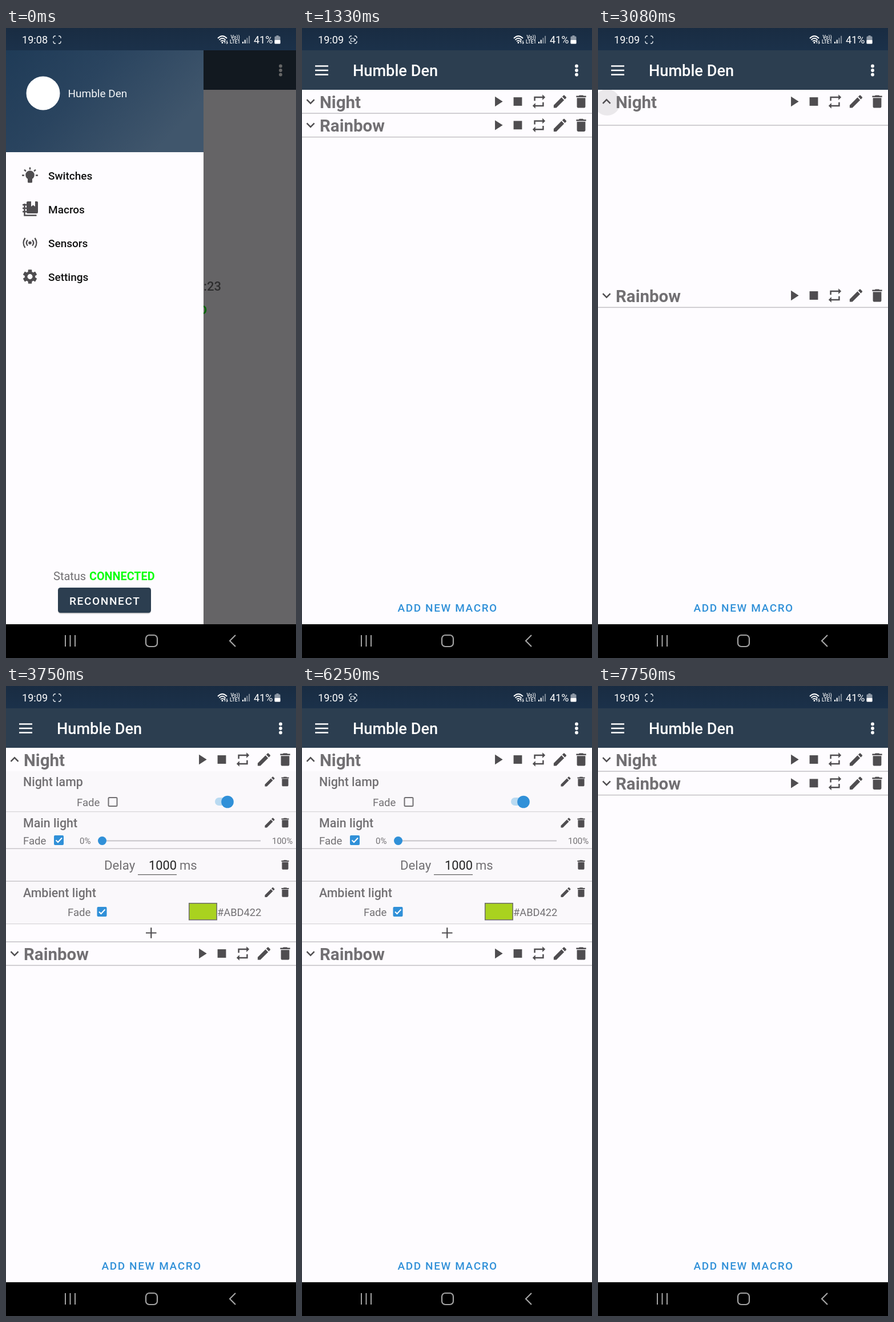
Write an HTML page that moves like this. It is 508 px wide and 1101 px high and loops after 8 s.

```html
<!DOCTYPE html>
<html lang="en">
<head>
<meta charset="utf-8">
<title>Room control</title>
<style>
  html, body { margin: 0; width: 100%; height: 100%; overflow: hidden; background: #000; }
  svg { display: block; width: 100%; height: 100%; font-family: Roboto, "Noto Sans", sans-serif; }
  text { white-space: pre; }
</style>
</head>
<body>
<svg id="stage" viewBox="0 0 508 1101"></svg>
<script>
const LOOP = 8000, APP = "Humble Den";
const PAGE = "#fefcff", BAR = "#2c3e50", GREY = "#727073", DARK = "#4f4d50", BLUE = "#3090d8";

const ICONS = {
  more: "M16.59 8.59 12 13.17 7.41 8.59 6 10l6 6 6-6z",
  less: "M12 8l-6 6 1.41 1.41L12 10.83l4.59 4.58L18 14z",
  play: "M8 5v14l11-7z",
  stop: "M6 6h12v12H6z",
  pause: "M6 19h4V5H6zM14 5v14h4V5z",
  repeat: "M7 7h10v3l4-4-4-4v3H5v6h2zM17 17H7v-3l-4 4 4 4v-3h12v-6h-2z",
  edit: "M3 17.25V21h3.75L17.81 9.94l-3.75-3.75zM20.71 7.04c.39-.39.39-1.02 0-1.41l-2.34-2.34c-.39-.39-1.02-.39-1.41 0l-1.83 1.83 3.75 3.75z",
  trash: "M6 19c0 1.1.9 2 2 2h8c1.1 0 2-.9 2-2V7H6zM19 4h-3.5l-1-1h-5l-1 1H5v2h14z"
};

const text = (x, y, size, str, fill = GREY, more = "") =>
  `<text x="${x}" y="${y}" font-size="${size}" fill="${fill}" ${more}>${str}</text>`;
const rect = (x, y, w, h, fill, more = "") =>
  `<rect x="${x}" y="${y}" width="${w}" height="${h}" fill="${fill}" ${more}/>`;
const disc = (x, y, r, fill, more = "") =>
  `<circle cx="${x}" cy="${y}" r="${r}" fill="${fill}" ${more}/>`;
const line = (d, color, width, more = "") =>
  `<path d="${d}" fill="none" stroke="${color}" stroke-width="${width}" ${more}/>`;
const icon = (name, x, y, scale = 1.235, fill = DARK, more = "") =>
  `<path d="${ICONS[name]}" fill="${fill}" transform="translate(${x} ${y}) scale(${scale}) translate(-12 -12)" ${more}/>`;
const group = (id, body, more = "") => `<g id="${id}" ${more}>${body}</g>`;
const MEDIUM = 'font-weight="500"', BOLD = 'font-weight="700"';

function statusBar() {
  const corners = "M83 18v-1q0-3 3-3h1M92 14h1q3 0 3 3v1M96 23v1q0 3-3 3h-1M87 27h-1q-3 0-3-3v-1";
  const bars = [0, 1, 2, 3].map(i =>
    rect(414 + i * 3.7, 24 - i * 3.4, 2, 3 + i * 3.4, "#fff", i > 1 ? 'opacity=".45"' : "")).join("");
  return rect(0, 0, 508, 39, "url(#sky)") +
    text(28, 27, 18.1, "", "#fff", 'id="clock"') +
    line(corners, "#e8edf2", 1.3) +
    group("camera", rect(85.5, 18, 6, 5.5, "none", 'rx="1" stroke="#e8edf2" stroke-width="1.2"') +
      `<path d="M91.5 20.5l2.5-2v4.5z" fill="#e8edf2"/>`) +
    line("M371 18q8-8 16 0M373.5 20.8q5.500-5.500 11 0M376 23.400q3-3 6 0", "#fff", 1.8) +
    disc(379, 25.5, 1.5, "#fff") +
    line("M383.5 27v-5l-1.500 1.500M387 22v5l1.500-1.500", "#fff", 1.2) +
    text(393.5, 19, 8.5, "Vo))", "#fff", MEDIUM) + text(392, 27, 8.3, "LTE1", "#fff", MEDIUM) +
    bars + text(434, 27, 18, "41%", "#fff") +
    rect(473.500, 13, 4, 2, "#8d98a5") + rect(470.5, 14.500, 10, 13, "#8d98a5", 'rx="1.5"') +
    rect(470.5, 21, 10, 6.500, "#fff", 'rx="1"');
}

const toolbar = () => rect(0, 39, 508, 69, BAR) +
  line("M23 66.5h23M23 74h23M23 81.500h23", "#fff", 2.6) +
  text(89, 84, 27.2, APP, "#fff", MEDIUM) +
  [66.500, 74, 81.500].map(y => disc(481, y, 2.9, "#fff")).join("");

const navBar = () => rect(0, 1042, 508, 59, "#000") +
  line("M104 1061v20M112.500 1061v20M121 1061v20", "#a3a3a3", 2) +
  rect(245, 1061, 20, 20, "none", 'rx="6" stroke="#a3a3a3" stroke-width="2.2"') +
  line("M402 1061l-10 10 10 10", "#a3a3a3", 2.2);

// Title row of a macro, drawn at the place of the first one
const macroRow = (name, arrow, start) => text(31, 139.5, 29.5, name, GREY, BOLD) + arrow + start +
  icon("stop", 378, 128.5) + icon("repeat", 415, 128.5) + icon("edit", 452, 128.5) + icon("trash", 489, 128.5);

const tools = (y, edit = true) => (edit ? icon("edit", 462, y, .95) : "") + icon("trash", 489, y, .93);
const fade = (x, y) => text(x, y, 18.6, "Fade");
const checked = (x, y) => rect(x - 8.500, y - 8.500, 17, 17, BLUE, 'rx="2"') +
  line(`M${x - 5} ${y}l3.500 3.500 7-7.500`, "#fff", 2);
const divider = (y, color = "#d9d7da") => rect(0, y, 508, 1.3, color);

function steps() {
  return rect(0, 149, 508, 267, "#faf8fb") +
    text(30, 175, 21.4, "Night lamp", GREY, MEDIUM) + tools(167) + fade(124, 209.5) +
    rect(179.5, 195, 15, 15, "none", `rx="1.500" stroke="${GREY}" stroke-width="2"`) +
    rect(366, 195, 30, 14, "#b9daf1", 'rx="7"') + disc(388, 202.5, 10.8, BLUE) + divider(219) +
    text(30, 247, 21.4, "Main light", GREY, MEDIUM) + tools(239) + fade(30, 277) + checked(92.5, 269.5) +
    text(129, 276, 15, "0%") + text(466, 276, 15, "100%") +
    rect(169, 269.500, 277, 2, "#c6c4c8") + disc(168.5, 270.5, 7.5, BLUE) + divider(283.500, "#c2c0c3") +
    text(172, 321, 22.2, "Delay") + text(250, 321, 21.8, "1000", "#222") + text(304, 321, 22, "ms") +
    rect(231, 329, 68, 1.3, "#666") + tools(312.5, false) + divider(340.500, "#c2c0c3") +
    text(30, 368.5, 21.4, "Ambient light", GREY, MEDIUM) + tools(360.5) + fade(108, 401.5) + checked(168, 394.5) +
    rect(320.7, 379.7, 48.5, 29, "#a9d21f", 'stroke="#6d6b6e" stroke-width="1.500"') +
    text(370, 401.5, 18.3, "#ABD422") + divider(415) +
    line("M245 431.500h18.500M254.250 422.300v18.500", DARK, 2.2) +
    icon("play", 13.5, 0, 1.235, "#6d9f1c", 'id="marker"');
}

const macros = () =>
  `<clipPath id="reveal"><rect id="revealBox" y="149" width="508"/></clipPath>` +
  `<clipPath id="firstRow"><rect y="108" width="508" height="42"/></clipPath>` +
  `<clipPath id="tall"><rect y="108" width="508" height="60"/></clipPath>` +
  group("steps", steps(), 'clip-path="url(#reveal)"') +
  rect(0, 108, 508, 41, PAGE) +
  `<g clip-path="url(#tall)">${disc(0, 130, 23, "#000", 'id="ripple"')}</g>` +
  macroRow("Night", icon("more", 15, 128.5, 1.235, DARK, 'id="down"') + icon("less", 15, 128.5, 1.235, DARK, 'id="up"'),
    icon("play", 343, 128.5, 1.235, DARK, 'id="play"') + icon("pause", 343, 128.5, 1.235, DARK, 'id="pause"')) +
  group("second", rect(0, 108, 508, 41, PAGE) +
    macroRow("Rainbow", icon("more", 15, 128.5), icon("play", 343, 128.5)) +
    rect(0, 148.5, 508, 1.6, "#c6c4c8", 'id="secondEdge"')) +
  rect(0, 0, 508, 1.6, "#c6c4c8", 'id="firstEdge"') +
  text(167.5, 1020, 19, "ADD NEW MACRO", BLUE, MEDIUM + ' letter-spacing="1.6"');

const home = () => text(377, 459, 22, ":23", GREY, MEDIUM + ' text-anchor="end"') +
  text(352, 500, 20, "D", "#0f0", BOLD + ' text-anchor="end"');

function drawerIcons() {
  const rays = [-90, -45, 0, 180, 225].map(a =>
    `<path d="M10 0h4" stroke="${DARK}" stroke-width="2.4" transform="translate(42 257.5) rotate(${a})"/>`).join("");
  const teeth = [0, 60, 120].map(a =>
    rect(-3.3, -12.3, 6.6, 24.6, DARK, `rx="1" transform="translate(42 434.5) rotate(${a})"`)).join("");
  return rays + disc(42, 257, 7.8, DARK) + rect(38, 262, 8, 8.5, DARK, 'rx="1.5"') +
    rect(36, 303, 20, 21, DARK, 'rx="2"') + `<path d="M44 303h7v9l-3.500-2.500-3.500 2.500z" fill="${PAGE}"/>` +
    line("M32.500 307v20.500h21", DARK, 2.6) + line("M29 309h7M29 315h7M29 321h7", DARK, 2.4) +
    disc(42, 375.5, 2.8, DARK) +
    line("M38 370.500q-4.500 5 0 10M46 370.500q4.500 5 0 10M33.500 367q-6 8.500 0 17M50.500 367q6 8.500 0 17", DARK, 2.3) +
    teeth + disc(42, 434.5, 6.800, PAGE, `stroke="${DARK}" stroke-width="5"`) + disc(42, 434.5, 4.4, PAGE);
}

const drawer = () => rect(0, 39, 346, 1003, PAGE) + rect(0, 39, 346, 178, "url(#head)") +
  disc(65, 114, 29.5, "#fff") + text(108.5, 121, 19, APP, "#f4f6f8") + drawerIcons() +
  ["Switches", "Macros", "Sensors", "Settings"].map((s, i) =>
    text(74, 264.5 + i * 59.3, 19, s, "#111", MEDIUM)).join("") +
  text(83, 965, 20, "Status") + text(146, 965, 19.8, "CONNECTED", "#0cff0c", BOLD) +
  rect(91, 980, 163, 44, "#000", 'rx="5" opacity=".18"') + rect(91, 978, 163, 44, BAR, 'rx="4.500"') +
  text(111, 1007.5, 19, "RECONNECT", "#fff", MEDIUM + ' letter-spacing="1.65"');

const stage = document.getElementById("stage");
stage.innerHTML = `<defs>
  <linearGradient id="sky" x2="0" y2="1"><stop stop-color="#192c42"/><stop offset="1" stop-color="#1b314a"/></linearGradient>
  <linearGradient id="head" x2="1" y2=".5"><stop stop-color="#1f3b57"/><stop offset=".45" stop-color="#2a445f"/><stop offset="1" stop-color="#40566c"/></linearGradient>
  </defs>` + rect(0, 0, 508, 1101, PAGE) + group("macros", macros()) + group("home", home()) + toolbar() +
  rect(0, 39, 508, 1003, "#000", 'id="scrim"') + group("drawer", drawer()) + statusBar() + navBar();

const el = id => document.getElementById(id);
const set = (id, attrs) => { for (const k in attrs) el(id).setAttribute(k, attrs[k]); };
const show = (id, on) => set(id, { visibility: on ? "visible" : "hidden" });
const ramp = (t, start, span) => Math.min(1, Math.max(0, (t - start) / span));

// Taps: start, centre x, radius, colour, strength
const TAPS = [[3060, 16, 23, "#000", .08], [4160, 343, 23, "#000", .08], [6830, 15, 23, "#40a0c8", .17]];
// Running step: start and height of its marker
const RUN = [[4420, 168], [4500, 240], [4580, 312.5], [5420, 361]];
const RUN_END = 5670;

function draw(t) {
  const away = ramp(t, 1250, 80), atHome = t < 1250;
  el("clock").textContent = atHome ? "19:08" : "19:09";
  show("camera", Math.floor((t + 250) / 500) % 2);
  show("home", atHome);
  set("macros", { display: atHome ? "none" : "inline" });
  set("drawer", { transform: `translate(${-346 * away})` });
  set("scrim", { opacity: .6 * (1 - away) });

  const open = t >= 3080 && t < 6900, visible = t >= 3080 && t < 7125;
  const bottom = 149 + 298 * ramp(t, 3060, 300);
  show("up", open);
  show("down", !open);
  set("revealBox", { height: visible ? bottom - 149 : 0 });
  set("steps", { opacity: Math.min(ramp(t, 3100, 300), 1 - ramp(t, 6875, 250)) });
  set("firstEdge", { y: (visible ? bottom : 149) - .7 });
  set("second", { transform: `translate(0 ${open ? 339 : 41.3})` });
  show("secondEdge", open || !visible);

  const running = t >= 4330 && t < RUN_END;
  show("pause", running);
  show("play", !running);
  const step = RUN.filter(s => t >= s[0]).pop();
  const marked = step && t < RUN_END;
  show("marker", marked);
  if (marked) set("marker", { transform: `translate(13.5 ${step[1]}) scale(1.235) translate(-12 -12)` });

  const tap = TAPS.find(([start]) => t >= start && t < start + 640);
  if (tap) set("ripple", { cx: tap[1], r: tap[2], fill: tap[3], opacity: tap[4] * (1 - ramp(t, tap[0] + 240, 400)) });
  show("ripple", tap);
}

const begin = performance.now();
function tick() {
  draw((performance.now() - begin) % LOOP);
  requestAnimationFrame(tick);
}
tick();
</script>
</body>
</html>
```
